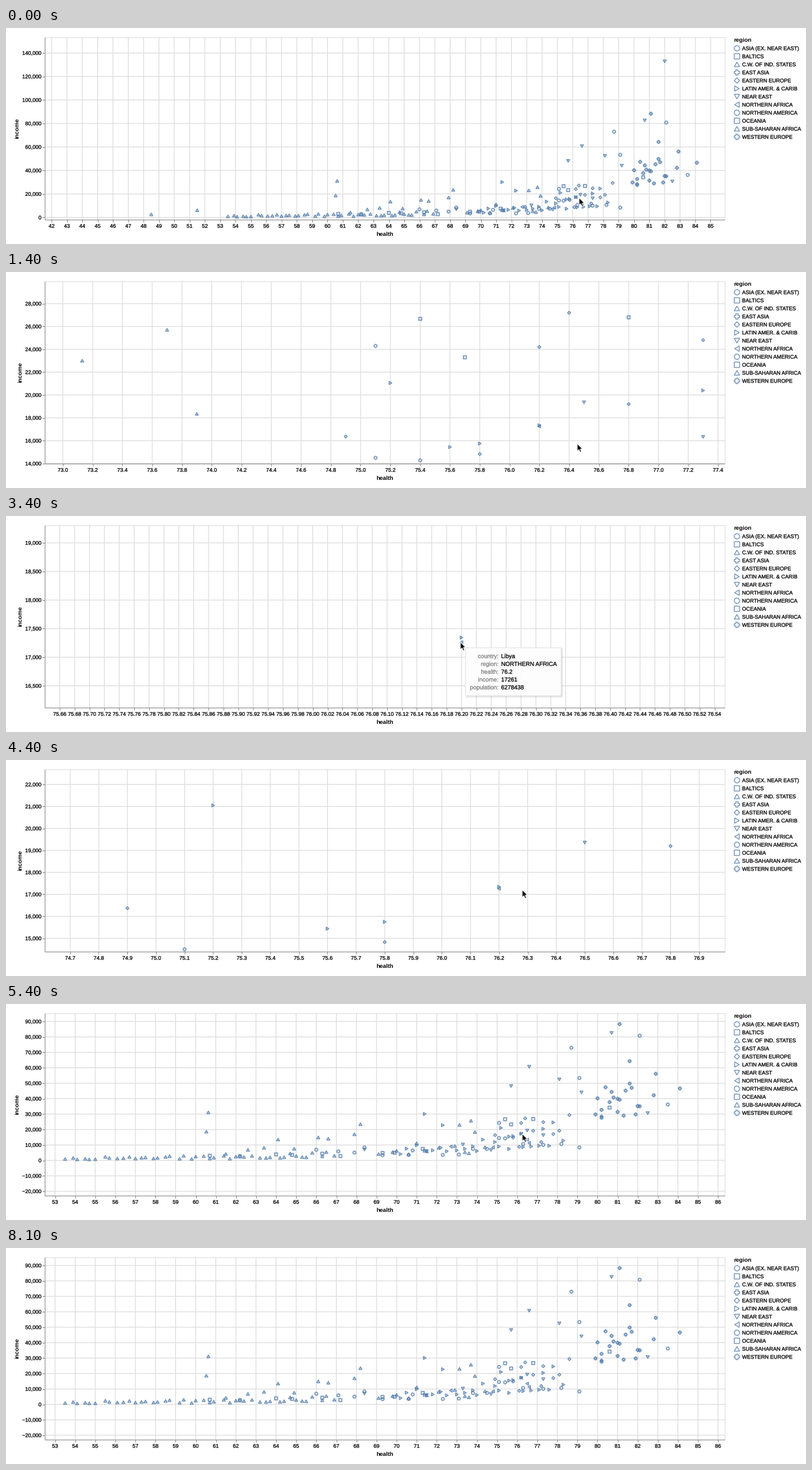
A matplotlib script that plays this animation: 1280x346 px, repeating every 8400 ms.

```python
import math
import numpy as np
import matplotlib.pyplot as plt
from matplotlib.animation import FuncAnimation
from matplotlib.collections import LineCollection, PathCollection
from matplotlib.patches import FancyBboxPatch, Polygon, Rectangle
from matplotlib.path import Path
from matplotlib.patheffects import Stroke
from matplotlib.transforms import IdentityTransform

W, H, DPI = 1280, 346, 100
PT = 72 / DPI                     # points per pixel
ZOOM = 0.85                       # chart units to pixels
LEFT, RIGHT, TOP, BOTTOM = 62.4, 1150, 14.5, 307
BLUE, GRID, AXIS = "#4c78a8", "#dddddd", "#888888"

plt.rcParams["font.family"] = "Liberation Sans"
plt.rcParams["text.hinting"] = "none"

SHAPES = ["circle", "square", "up", "cross", "diamond", "right", "down", "left"]
REGIONS = ["ASIA (EX. NEAR EAST)", "BALTICS", "C.W. OF IND. STATES", "EAST ASIA",
           "EASTERN EUROPE", "LATIN AMER. & CARIB", "NEAR EAST",
           "NORTHERN AFRICA", "NORTHERN AMERICA", "OCEANIA",
           "SUB-SAHARAN AFRICA", "WESTERN EUROPE"]

# Points that stand alone: the close-up and the outliers (health, income in thousands)
LANDMARKS = {
    "circle": [(78.7, 73), (82.1, 80.8), (79.1, 53.35), (83.5, 36.2), (75.1, 24.3),
               (75.1, 14.5)],
    "square": [(75.4, 26.67), (76.8, 26.8), (75.7, 23.3), (80.6, 34.2)],
    "up": [(48.5, 2.6), (51.5, 6.1), (60.63, 31.1), (60.53, 18.6), (68.2, 23.47),
           (73.7, 25.7), (73.13, 23), (73.9, 18.35)],
    "cross": [(81.1, 88.3), (81.6, 64.3), (82.9, 56.1), (84.1, 46.6), (82.8, 42.2)],
    "diamond": [(74.9, 16.37), (75.8, 14.83), (76.8, 19.2), (76.4, 27.2),
                (76.2, 24.2), (77.3, 24.8), (78.6, 29.4), (80.2, 28.55)],
    "right": [(76.2, 17.344), (75.2, 21.05), (75.6, 15.44), (75.8, 15.75),
              (71.4, 30.1), (72.3, 22.8), (77.3, 20.4)],
    "down": [(82, 132.9), (80.7, 82.6), (76.6, 60.7), (78.1, 52.5), (75.7, 48.2),
             (79.2, 44.1), (76.5, 19.36), (82.5, 30.7)],
    "left": [(76.2, 17.261), (76.5, 13.43)],
}
# Crowds: shape, count, health range, income range in thousands, spread
CROWDS = [
    ("circle", 16, 65.5, 79.5, 3.5, 12, .4),
    ("square", 9, 60.6, 72.2, 2.2, 6, .25),
    ("up", 44, 53.4, 67, 1.1, 3, .4),
    ("up", 8, 61, 68, 6, 14, .3),
    ("up", 11, 68.8, 74.6, 4, 10, .45),
    ("cross", 18, 79.8, 82.2, 36, 39, .18),
    ("diamond", 6, 76, 78.2, 11, 18, .2),
    ("right", 22, 70, 78.5, 6, 17, .35),
    ("down", 5, 67.6, 78.5, 4.5, 15, .3),
    ("left", 3, 71.3, 77.3, 9, 11.5, .15),
]


def scatter():
    """Shape names and an array of health, income."""
    rng = np.random.default_rng(7)
    rows = [(k, h, inc) for k, pts in LANDMARKS.items() for h, inc in pts]
    for kind, n, h0, h1, i0, i1, spread in CROWDS:
        t = (np.arange(n) + rng.uniform(.1, .9, n)) / n
        health = np.round(h0 + (h1 - h0) * t, 1)
        money = i0 * (i1 / i0) ** t * np.exp(spread * rng.uniform(-1.6, 1.6, n))
        # The close-up holds landmarks only
        free = (abs(health - 75.8) > 1.25) | (abs(money - 19) > 4.4)
        rows += [(kind, h, m) for h, m in zip(health[free], money[free])]
    return [r[0] for r in rows], np.array([(r[1], r[2] * 1000) for r in rows])


def symbol(kind, area):
    """Outline in pixels, y up."""
    r = math.sqrt(area) / 2 * ZOOM
    h, s = r * math.sqrt(3) / 2, r / 2.5
    if kind == "circle":
        return Path.circle(radius=r)
    pts = {
        "square": [(-r, -r), (-r, r), (r, r), (r, -r)],
        "up": [(0, h), (-r, -h), (r, -h)],
        "down": [(0, -h), (-r, h), (r, h)],
        "right": [(h, 0), (-h, -r), (-h, r)],
        "left": [(-h, 0), (h, -r), (h, r)],
        "diamond": [(-r, 0), (0, r), (r, 0), (0, -r)],
        "cross": [(-r, -s), (-r, s), (-s, s), (-s, r), (s, r), (s, s),
                  (r, s), (r, -s), (s, -s), (s, -r), (-s, -r), (-s, -s)],
    }[kind]
    return Path(pts + pts[:1], closed=True)


# Resting domains: x0, x1, y0, y1
VIEWS = np.array([
    (41.568, 85.918, -1860, 153548),
    (68.133, 78.754, 11692, 48906),
    (74.6155, 76.967, 14831, 23056),
    (75.64017, 76.55386, 16118, 19311),
    (71.902, 78.1376, 9851, 31639),
    (52.499, 86.333, -22831, 95459)])
# Wheel bursts and rests: frame, position along VIEWS
WHEEL = np.array([
    (0, 0), (5, .58), (6, .58), (9, 1), (11, 1.26), (12, 1.26), (14, 1.56),
    (16, 1.56), (19, 2), (22, 2), (24, 3), (41, 3), (46, 3.83), (47, 3.83),
    (48, 4), (50, 4.5), (52, 4.5), (54, 5)])
# Pointer stops: frame, x, y
POINTER = np.array([
    (0, 917, 272), (9, 914, 275), (19, 914, 275), (21, 836.5, 231),
    (25, 836.5, 231), (29, 696, 220), (31, 723, 206), (32, 723, 206),
    (33, 727, 202), (36, 727, 202), (38, 727, 193), (39, 727, 193),
    (41, 826, 208), (54, 826, 208), (61, 751, 311), (63, 620, 231),
    (66, 620, 231), (70, 279, 195)])
POINTER_END = 71
ARROW = np.array([(0, 0), (0, 11.8), (2.7, 9.4), (4.6, 13.8), (6.6, 13),
                  (4.8, 8.7), (8.3, 8.5)])

KEYS = ["country", "region", "health", "income", "population"]
TIPS = [
    (range(33, 38), 153, ["Libya", "NORTHERN AFRICA", "76.2", "17261", "6278438"]),
    (range(38, 40), 162, ["Argentina", "LATIN AMER. & CARIB", "76.2", "17344",
                          "43416755"]),
]


def along(keys, frame):
    """Interpolate every column of a key table at a frame."""
    return [np.interp(frame, keys[:, 0], col) for col in keys.T[1:]]


def domain(frame):
    pos, = along(WHEEL, frame)
    i = min(int(pos), len(VIEWS) - 2)
    a, b = VIEWS[i], VIEWS[i + 1]
    ratio = (b[1] - b[0]) / (a[1] - a[0])
    # Geometric zoom about a fixed anchor
    w = (ratio ** (pos - i) - 1) / (ratio - 1)
    return a + (b - a) * w


def ticks(lo, hi, count):
    raw = (hi - lo) / count
    power = 10.0 ** math.floor(math.log10(raw))
    err = raw / power
    mult = 10 if err >= 50 ** .5 else 5 if err >= 10 ** .5 else 2 if err >= 2 ** .5 else 1
    step = power * mult
    first, last = math.ceil(lo / step), math.floor(hi / step)
    return [i * step for i in range(first, last + 1)], step


fig = plt.figure(figsize=(W / DPI, H / DPI), dpi=DPI, facecolor="white")
ax = fig.add_axes([0, 0, 1, 1])
ax.set_xlim(0, W)
ax.set_ylim(H, 0)
ax.axis("off")


def label(x, y, s, color="black", **kw):
    """Regular text, slightly thickened."""
    size = kw.pop("size", 8.5)
    heavy = [Stroke(linewidth=.3 * PT, foreground=color)]
    return ax.text(x, y, s, fontsize=size * PT, color=color, va="baseline",
                   path_effects=heavy, **kw)


def title(x, y, s, **kw):
    return ax.text(x, y, s, fontsize=9.35 * PT, weight="bold", color="black", **kw)


def lines(color, width, z, snap):
    c = LineCollection([], colors=color, linewidths=width * PT, zorder=z)
    c.set_snap(snap)
    ax.add_collection(c)
    return c


def symbols(paths, offsets, width, z):
    c = PathCollection(paths, offsets=offsets, offset_transform=ax.transData,
                       facecolors="none", edgecolors=BLUE, alpha=.76,
                       linewidths=width * PT, zorder=z)
    c.set_transform(IdentityTransform())
    c.set_snap(False)
    ax.add_collection(c)
    return c


plot = Rectangle((LEFT, TOP), RIGHT - LEFT, BOTTOM - TOP, fc="none", ec=GRID,
                 lw=PT, zorder=1)
ax.add_patch(plot)
grid, marks = lines(GRID, 1.25, 1, False), lines(AXIS, 1, 2, True)

kinds, points = scatter()
dots = symbols([symbol(k, 30) for k in kinds], points, 1.7, 3)
dots.set_clip_path(plot)

# Legend and titles
title(1164, 22, "region")
rows = [32.5 + 12.9 * i for i in range(len(REGIONS))]
for y, name in zip(rows, REGIONS):
    label(1177.7, y + 3, name)
symbols([symbol(SHAPES[i % 8], 100) for i in range(len(REGIONS))],
        [(1169.5, y) for y in rows], 1.4, 3)
title(606, 332.5, "health", ha="center")
income = title(18, 160.5, "income", ha="center", va="center", rotation=90)

arrow = Polygon(ARROW, fc="black", ec="white", lw=.9 * PT, joinstyle="round", zorder=9)
ax.add_patch(arrow)
live = []


def draw_tip(x, y, width, values):
    height = 77

    def box(shift, grow, **kw):
        p = FancyBboxPatch((x + shift - grow, y + shift - grow), width + 2 * grow,
                           height + 2 * grow,
                           boxstyle="round,pad=0,rounding_size=2", **kw)
        live.append(ax.add_patch(p))

    for grow in (2, 1, 0):
        box(1.7, grow, fc="black", ec="none", alpha=.035, zorder=6)
    box(0, 0, fc=(1, 1, 1, .95), ec="#e0e0e0", lw=PT, zorder=7)
    for i, (key, value) in enumerate(zip(KEYS, values)):
        base = y + 16.6 + 12.5 * i
        live.append(label(x + 53, base, key + ":", "#808080", size=9.35,
                          ha="right", zorder=8))
        live.append(label(x + 57, base, value, size=9.35, zorder=8))


def update(frame):
    while live:
        live.pop().remove()
    x0, x1, y0, y1 = domain(frame)

    def px(v):
        return LEFT + (v - x0) / (x1 - x0) * (RIGHT - LEFT)

    def py(v):
        return BOTTOM - (v - y0) / (y1 - y0) * (BOTTOM - TOP)

    xs, step = ticks(x0, x1, 32)
    ys, _ = ticks(y0, y1, 9)
    digits = max(0, -math.floor(math.log10(step) + 1e-9))
    names = [f"{v:,.0f}".replace("-", "\u2212") for v in ys]

    grid.set_segments([[(px(v), TOP), (px(v), BOTTOM)] for v in xs]
                      + [[(LEFT, py(v)), (RIGHT, py(v))] for v in ys])
    marks.set_segments([[(px(v), BOTTOM), (px(v), BOTTOM + 4.3)] for v in xs]
                       + [[(LEFT - 4.3, py(v)), (LEFT, py(v))] for v in ys]
                       + [[(LEFT, TOP), (LEFT, BOTTOM)],
                          [(LEFT, BOTTOM), (RIGHT, BOTTOM)]])
    for v in xs:
        live.append(label(px(v), 320, f"{v:.{digits}f}", ha="center"))
    for v, name in zip(ys, names):
        live.append(label(56.7, py(v) + 3, name, ha="right"))
    income.set_x(18 if max(map(len, names)) > 6 else 23)
    dots.set_offsets(np.column_stack([px(points[:, 0]), py(points[:, 1])]))

    cx, cy = along(POINTER, frame)
    arrow.set_xy(ARROW + (cx, cy))
    arrow.set_visible(frame < POINTER_END)
    for span, width, values in TIPS:
        if frame in span:
            draw_tip(cx + 8.2, cy + 9, width, values)
    return []


anim = FuncAnimation(fig, update, frames=84, interval=100, repeat=True,
                     repeat_delay=0, init_func=lambda: [], cache_frame_data=False)
plt.show()
```
